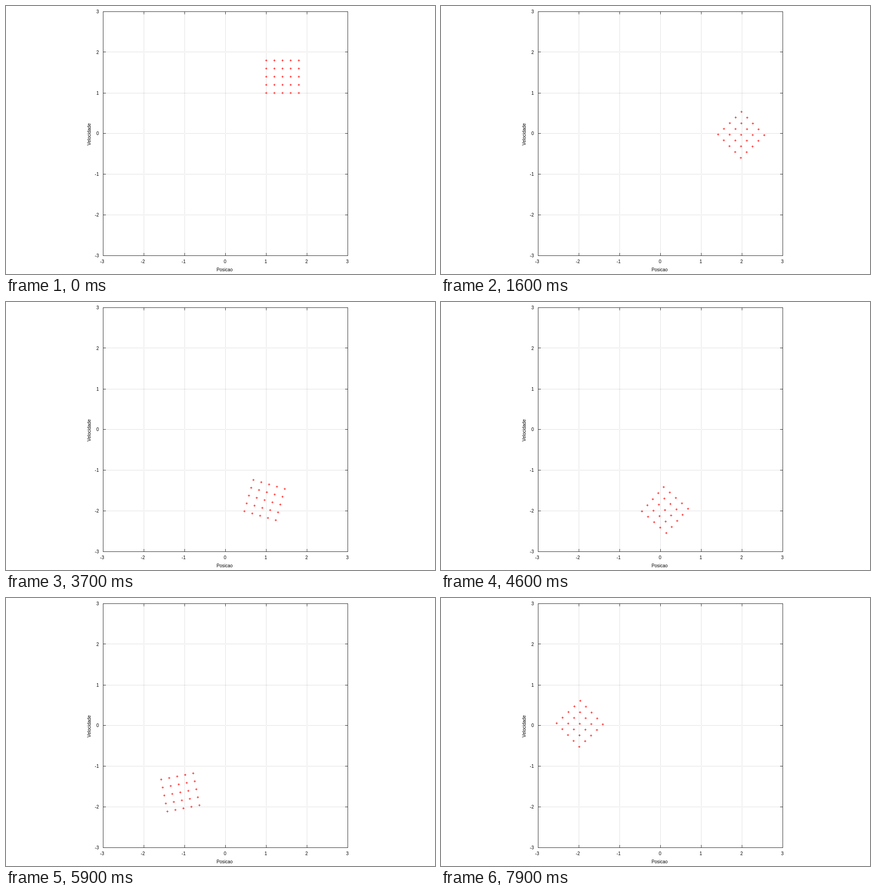
An HTML page with a canvas for the animation above (8000 ms loop, 947x592 px).

```html
<!DOCTYPE html>
<html lang="pt">
<head>
<meta charset="utf-8">
<title>Espaco de fase</title>
<style>
html, body { margin: 0; width: 100%; height: 100%; overflow: hidden; background: #fff; }
canvas { display: block; }
</style>
</head>
<body>
<canvas id="stage" width="947" height="592"></canvas>
<script>
const ctx = document.getElementById("stage").getContext("2d");
const LOOP = 8000, STEP = 100, TURN = 0.05;
const LEFT = 214.5, RIGHT = 754.5, TOP = 12.5, BOTTOM = 551.5;
const TICK = 6, ARM = 2.4;
// Grid rows from -3 to 3, snapped to whole pixels.
const ROWS = [551.5, 461.5, 371.5, 281.5, 192.5, 101.5, 12.5];

const toX = v => LEFT + (v + 3) * (RIGHT - LEFT) / 6;
const toY = v => BOTTOM - (v + 3) * (BOTTOM - TOP) / 6;

function line(x1, y1, x2, y2) {
  ctx.beginPath();
  ctx.moveTo(x1, y1);
  ctx.lineTo(x2, y2);
  ctx.stroke();
}

function drawGrid() {
  ctx.strokeStyle = "#a0a0a0";
  ctx.setLineDash([1, 2]);
  for (let v = -2; v <= 2; v++) {
    line(toX(v), Math.ceil(BOTTOM), toX(v), TOP);
    line(Math.floor(LEFT), ROWS[v + 3], RIGHT, ROWS[v + 3]);
  }
  ctx.setLineDash([]);
}

function drawFrame() {
  ctx.strokeStyle = "#282828";
  ctx.strokeRect(LEFT, TOP, RIGHT - LEFT, BOTTOM - TOP);
  for (let v = -2; v <= 2; v++) {
    const x = toX(v), y = ROWS[v + 3];
    line(x, BOTTOM, x, BOTTOM - TICK);
    line(x, TOP, x, TOP + TICK);
    line(LEFT, y, LEFT + TICK, y);
    line(RIGHT, y, RIGHT - TICK, y);
  }
}

function drawLabels() {
  ctx.fillStyle = "#000";
  ctx.font = '10px "Liberation Sans", Arial, sans-serif';
  for (let v = -3; v <= 3; v++) {
    ctx.textAlign = "right";
    ctx.fillText(v, 205, Math.round(toY(v) + 3.4));
    ctx.textAlign = "center";
    ctx.fillText(v, toX(v) - (v < 0 ? 2.5 : 1), 568);
  }
  ctx.fillText("Posicao", 482.5, 586);
  ctx.save();
  ctx.translate(187, 283.5);
  ctx.rotate(-Math.PI / 2);
  ctx.fillText("Velocidade", 0, 0);
  ctx.restore();
}

// Harmonic oscillator: every state turns clockwise about the origin.
function drawStates(angle) {
  const c = Math.cos(angle), s = Math.sin(angle);
  ctx.strokeStyle = "#f00";
  for (let i = 0; i < 5; i++) {
    for (let j = 0; j < 5; j++) {
      const p = 1 + 0.2 * i, v = 1 + 0.2 * j;
      const x = toX(p * c + v * s), y = toY(v * c - p * s);
      line(x - ARM, y, x + ARM, y);
      line(x, y - ARM, x, y + ARM);
    }
  }
}

function render(now) {
  const step = Math.floor((now % LOOP) / STEP);
  ctx.fillStyle = "#fff";
  ctx.fillRect(0, 0, 947, 592);
  ctx.lineWidth = 1;
  drawGrid();
  drawLabels();
  drawStates(step * TURN);
  drawFrame();
}

const start = performance.now();
function tick() {
  render(performance.now() - start);
  requestAnimationFrame(tick);
}
tick();
</script>
</body>
</html>
```
